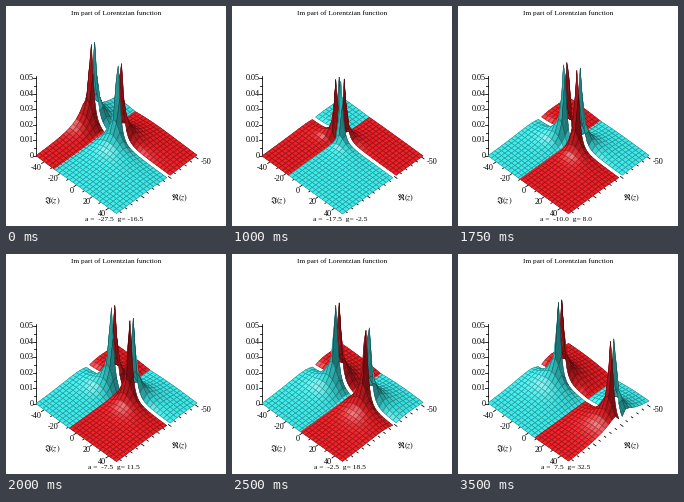
Animation, 220 px wide and 220 px high, one loop 3750 ms. Source, as a matplotlib script:

```python
import numpy as np
import matplotlib.pyplot as plt
from matplotlib.animation import FuncAnimation
from matplotlib.collections import PolyCollection

FRAMES, INTERVAL = 15, 250
PX = 0.72                    # points per pixel at 100 dpi
CELLS = 24
GAP = 15                     # open row that straddles the poles
STEP = 6.2                   # real-axis length of one cell
Z_SCALE = 78 / 0.05          # pixels per unit of height

LEFT, BOTTOM, RIGHT = np.array([[30, 150], [110.5, 208], [191, 150]])
RE_DIR, IM_DIR = RIGHT - BOTTOM, BOTTOM - LEFT

RED = np.array([0.97, 0.11, 0.14])
CYAN = np.array([0.24, 0.97, 0.97])


def unit(v):
    v = np.asarray(v, float)
    return v / np.linalg.norm(v, axis=-1, keepdims=True)


LIGHT = unit([-0.25, -0.35, 0.9])
SHINE = unit([-0.5, -0.02, 0.87])

# Rows run from the front edge to the back, columns along the imaginary axis
row = np.arange(CELLS + 1)
col = np.arange(2 * CELLS + 1)
re = STEP * (GAP + 0.5 - row)[:, None]
im = np.linspace(-50, 50, col.size)[None, :]
ground = (LEFT + row[:, None, None] / CELLS * RE_DIR
          + col[None, :, None] / (2 * CELLS) * IM_DIR)

# Painter's order: far cells first
order = sorted(((i, j) for i in range(CELLS) for j in range(CELLS) if i != GAP),
               key=lambda c: (c[1] - c[0], c[1]))
ci, cj = np.array(order).T

# Each cell is two filled halves and one outline, as (row, column) offsets
RINGS = np.array([
    [(0, 0), (0, 1), (1, 1), (1, 0), (1, 0), (1, 0)],
    [(0, 1), (0, 2), (1, 2), (1, 1), (1, 1), (1, 1)],
    [(0, 0), (0, 1), (0, 2), (1, 2), (1, 1), (1, 0)],
])


def lorentz_im(a, g):
    w = (im - a) + 1j * re
    return -(g / np.pi / (w ** 2 - g ** 2)).imag


def cell_polygons(height):
    pts = ground.copy()
    pts[..., 1] -= height * Z_SCALE
    r = ci[:, None, None] + RINGS[..., 0]
    c = 2 * cj[:, None, None] + RINGS[..., 1]
    return pts[r, c].reshape(-1, 6, 2)


def cell_colors(height, a, g):
    h = height * Z_SCALE / 0.79
    size = 100 / CELLS
    j = 2 * cj
    dx = (h[ci + 1, j] + h[ci + 1, j + 2] - h[ci, j] - h[ci, j + 2]) / (2 * size)
    dy = (h[ci, j + 2] + h[ci + 1, j + 2] - h[ci, j] - h[ci + 1, j]) / (2 * size)
    normal = unit(np.stack([-dx, -dy, np.ones_like(dx)], axis=1))
    shade = 0.46 + 0.54 * np.abs(normal @ LIGHT)
    gloss = 0.42 * np.clip(normal @ SHINE, 0, 1) ** 30

    mid = (im[0, :-1] + im[0, 1:]) / 2
    face = np.ones((ci.size, 3, 4))
    for k, column in enumerate((j, j + 1, j)):
        side = (GAP - ci) * (mid[column] - a) * g
        base = np.where((side > 0)[:, None], RED, CYAN) * shade[:, None]
        face[:, k, :3] = base + (1 - base) * gloss[:, None]
    edge = face.copy()
    edge[:, 2, :3] *= 0.48
    face[:, 2, 3] = 0
    return face.reshape(-1, 4), edge.reshape(-1, 4)


fig = plt.figure(figsize=(2.2, 2.2), dpi=100, facecolor="white")
ax = fig.add_axes([0, 0, 1, 1])
ax.set_xlim(0, 220)
ax.set_ylim(220, 0)
ax.axis("off")


def label(x, y, text, size=8.2, ha="center", **kw):
    return ax.text(x, y, text, fontsize=size * PX, ha=ha, va="center",
                   family="Liberation Serif", color="black", **kw)


def line(p, q, width=0.8):
    ax.plot([p[0], q[0]], [p[1], q[1]], color="black", lw=width * PX, zorder=1)


label(110.5, 7.5, "Im part of Lorentzian function", 7.4)

# Height axis
line((29.5, 150), (29.5, 70))
for k in range(11):
    y = 150 - k * 0.005 * Z_SCALE
    major = k % 2 == 0
    line((26.5 if major else 28, y), (29.5, y))
    if major:
        label(27.5, y, f"{k / 200:.2f}" if k else "0", ha="right")

# Imaginary axis
for v in range(-40, 41, 10):
    p = LEFT + (v + 50) / 100 * IM_DIR
    major = v % 20 == 0
    line(p, p + np.array([-2.5, 1.8]) * (1 if major else 0.6))
    if major:
        label(p[0] - 2, p[1] + 5.7, str(v), ha="right")
label(46, 195.5, r"$\Im(z)$", 8.2, math_fontfamily="stix")

# Real axis
for v in range(-50, 91, 10):
    p = BOTTOM + (GAP + 0.5 - v / STEP) / CELLS * RE_DIR
    line(p, p + np.array([2.5, 1.8]) * (1 if v % 50 == 0 else 0.6))
label(200.5, 155.5, "-50")
label(174, 192, r"$\Re(z)$", 8.2, math_fontfamily="stix")

surface = PolyCollection([], linewidths=0.42 * PX, zorder=2)
ax.add_collection(surface, autolim=False)
caption = label(108, 213, "", 7.5, zorder=4)


def update(n):
    a, g = -27.5 + 2.5 * n, -16.5 + 3.5 * n
    height = np.abs(lorentz_im(a, g))
    face, edge = cell_colors(height, a, g)
    surface.set_verts(cell_polygons(height))
    surface.set_facecolor(face)
    surface.set_edgecolor(edge)
    caption.set_text(f"a =  {a:.1f}  g= {g:.1f}")
    return surface, caption


anim = FuncAnimation(fig, update, frames=FRAMES, interval=INTERVAL,
                     repeat=True, repeat_delay=0, blit=False)
plt.show()
```
